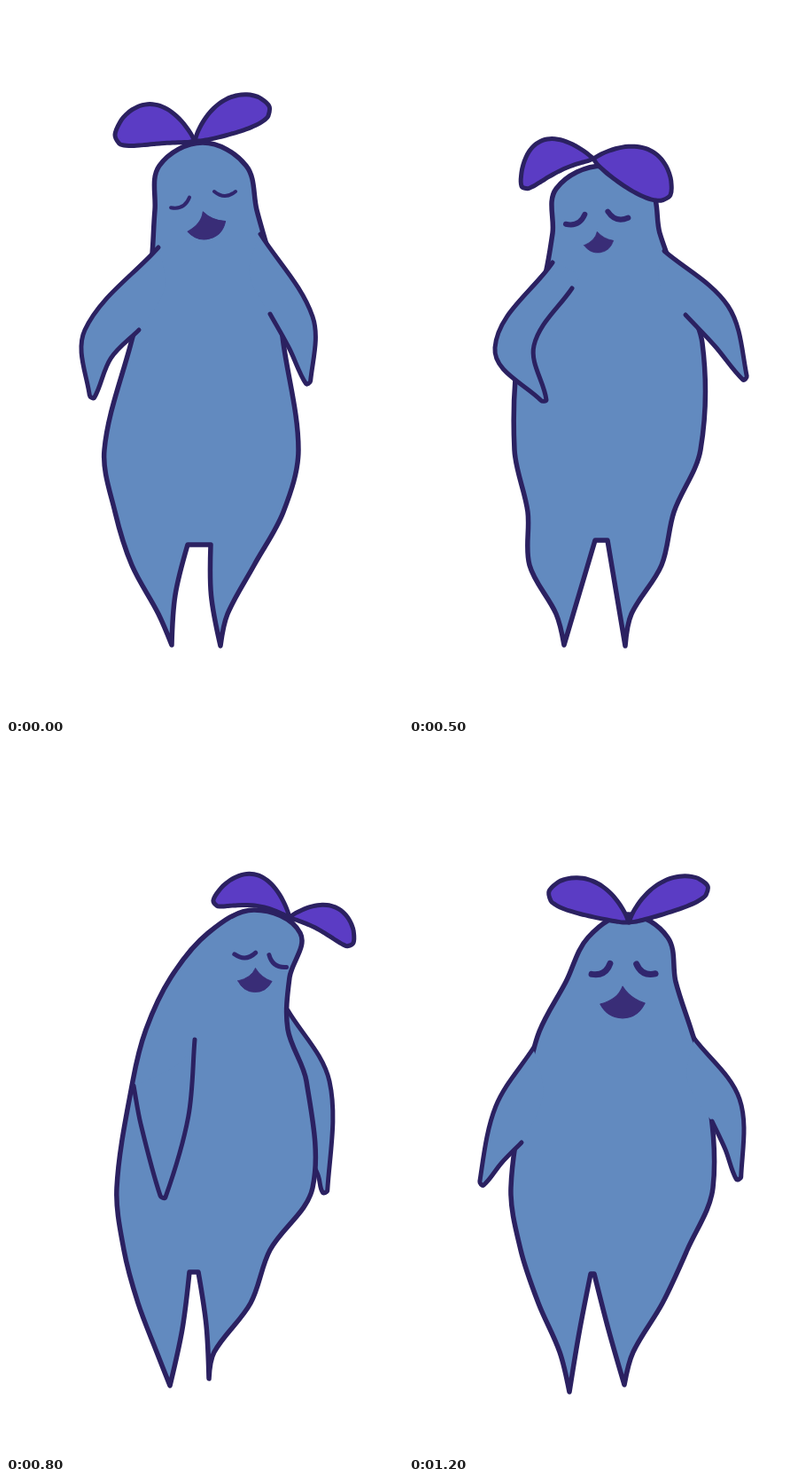
Animation, 448 px wide and 800 px high, one loop 1400 ms. Source, as an HTML page:

```html
<!DOCTYPE html>
<html lang="en">
<head>
<meta charset="utf-8">
<title>Dancing sprout</title>
<style>
  html, body { margin: 0; width: 100%; height: 100%; overflow: hidden; background: #fff; }
  svg { display: block; width: 100%; height: 100%; stroke-linejoin: round; stroke-linecap: round; }
</style>
</head>
<body>
<svg viewBox="0 0 448 800"></svg>
<script>
const INK = "#2b2161", SKIN = "#628abf", LEAF = "#5b3cc4", MOUTH = "#392d77";

// crown: x, y, half width      left, right: body edges from the cheeks down to the calves
// crotch: x, y, half gap, bend of the inner legs
// arms: shoulder, elbow, hand, armpit, bend of the inner edge
// leaves: tip, half width, bow      eyes: centre, angle      mouth: centre, angle, scale
const rest = {
  crown: [222, 154, 49], crotch: [218, 607, 13, -5], feet: [[187, 720], [242, 721]],
  left: [168, 162, 141, 111, 123, 142, 172], right: [283, 303, 313, 330, 313, 280, 250],
  arms: [[[172, 272], [89, 365], [97, 440], [150, 365], .15],
         [[287, 257], [346, 350], [341, 424], [298, 347], 0]], behind: 0,
  stem: [213, 152], leaves: [[123, 145, 23, 15], [297, 113, 20, -8]], point: .5,
  eyes: [[198, 224, -29], [247, 212, 0]], eyeWidth: 4, mouth: [226, 247, -14, .92]
};
const tipLeft = {
  crown: [197, 158, 48], crotch: [210, 608, 11, -11], feet: [[189, 717], [248, 718]],
  left: [138, 148, 144, 117, 130, 131, 165], right: [264, 297, 317, 336, 310, 283, 260],
  arms: [[[150, 296], [90, 375], [83, 450], [151, 363], .2],
         [[278, 267], [349, 338], [360, 434], [306, 362], 0]], behind: 0,
  stem: [180, 162], leaves: [[86, 176, 24, 4], [237, 246, 21, -6]], point: .9,
  eyes: [[160, 258, -40], [197, 245, -6]], eyeWidth: 5, mouth: [187, 278, -15, .74]
};
const swingBack = {
  crown: [219, 180, 53], crotch: [217, 602, 7, 0], feet: [[175, 720], [244, 721]],
  left: [162, 150, 125, 119, 134, 136, 166], right: [283, 306, 331, 329, 299, 285, 251],
  arms: [[[162, 289], [97, 385], [152, 444], [184, 318], .38],
         [[288, 276], [360, 338], [379, 419], [312, 348], 0]], behind: 0,
  stem: [208, 172], leaves: [[127, 203, 20, 20], [295, 213, 25, -11]], point: .6,
  eyes: [[189, 243, -27], [235, 238, 17]], eyeWidth: 6, mouth: [214, 266, -8, .7]
};
const tipRight = {
  crown: [280, 187, 52], crotch: [212, 595, 5, 3], feet: [[185, 723], [229, 715]],
  left: [186, 158, 143, 125, 133, 149, 170], right: [320, 318, 339, 346, 298, 276, 235],
  arms: [[[144, 385], [152, 428], [177, 510], [213, 333], -.25],
         [[318, 300], [365, 380], [360, 504], [345, 470], 0]], behind: 1,
  stem: [320, 195], leaves: [[234, 176, 18, 21], [392, 224, 16, -14]], point: .5,
  eyes: [[270, 239, -4], [305, 247, 35]], eyeWidth: 5, mouth: [281, 266, 2, .8]
};
const farRight = {
  crown: [305, 210, 47], crotch: [208, 597, 1, 4], feet: [[168, 727], [219, 719]],
  left: [208, 173, 149, 125, 137, 155, 164], right: [347, 335, 341, 347, 304, 269, 224],
  arms: [[[158, 368], [172, 430], [216, 500], [203, 340], -.1],
         [[336, 352], [369, 415], [354, 487], [346, 440], 0]], behind: 1,
  stem: [345, 209], leaves: [[286, 287, 21, -6], [363, 299, 15, -18]], point: .6,
  eyes: [[289, 296, 0], [331, 307, 60]], eyeWidth: 6, mouth: [296, 325, 20, .72]
};
const squash = {
  crown: [247, 192, 45], crotch: [207, 597, 2, -1], feet: [[181, 730], [243, 722]],
  left: [177, 147, 133, 115, 126, 146, 170], right: [301, 319, 336, 343, 314, 286, 253],
  arms: [[[140, 343], [98, 408], [82, 495], [127, 449], 0],
         [[322, 332], [373, 400], [372, 489], [342, 425], 0]], behind: 0,
  stem: [248, 201], leaves: [[158, 166, 20, 9], [337, 160, 18, -8]], point: .5,
  eyes: [[218, 256, -30], [266, 256, 27]], eyeWidth: 7, mouth: [241, 291, 0, 1.05]
};

// Blends numbers, arrays and whole poses; t above 1 exaggerates.
function mix(a, b, t) {
  if (typeof a === "number") return a + (b - a) * t;
  const blend = key => mix(a[key], b[key], t);
  if (Array.isArray(a)) return a.map((_, i) => blend(i));
  return Object.fromEntries(Object.keys(a).map(key => [key, blend(key)]));
}
const headOf = ({ stem, leaves, point, eyes, eyeWidth, mouth }) =>
  ({ stem, leaves, point, eyes, eyeWidth, mouth });

const farLeft = {
  ...mix(rest, tipLeft, 1.3), ...headOf(farRight),
  crown: [170, 175, 48], place: "matrix(-1 0 0 1 472 -35)"
};
const tall = {
  ...mix(rest, tipRight, .5), ...headOf(rest),
  crown: [246, 145, 49], place: "translate(24 -9)"
};
const dance = [
  [rest, 200], [tipLeft, 100], [farLeft, 200], [swingBack, 100], [tall, 200],
  [tipRight, 100], [farRight, 200], [mix(farRight, squash, .5), 100], [squash, 200]
];
const loop = dance.reduce((sum, [, hold]) => sum + hold, 0);

// Smooth line through points [x, y, sharp].
function curve(pts, closed) {
  const n = pts.length;
  const at = i => closed ? pts[(i + n) % n] : pts[Math.min(Math.max(i, 0), n - 1)];
  const handle = (i, reach) => {
    const [x, y, sharp] = at(i), a = at(i - 1), b = at(i + 1);
    const dx = b[0] - a[0], dy = b[1] - a[1];
    const k = sharp ? 0 : reach / (Math.hypot(dx, dy) || 1);
    return [x + dx * k, y + dy * k];
  };
  let d = `M${pts[0].slice(0, 2)}`;
  for (let i = 0; i < (closed ? n : n - 1); i++) {
    const [x, y] = at(i), [u, v] = at(i + 1);
    const reach = Math.hypot(u - x, v - y) / 3;
    d += `C${handle(i, reach)} ${handle(i + 1, -reach)} ${u},${v}`;
  }
  return d;
}
const path = (d, fill, stroke = "none", width = 5.5, extra = "") =>
  `<path d="${d}" fill="${fill}" stroke="${stroke}" stroke-width="${width}" ${extra}/>`;

function torso({ crown: [cx, cy, half], left, right, feet, crotch: [x, y, gap, bend] }) {
  const cheek = cy + 76;
  const heights = [cheek, (cheek + 380) / 2, 380, 500, 570, 630, 685];
  const edge = xs => xs.map((ex, i) => [ex, heights[i]]);
  const leg = (foot, side) => {
    const top = [x + side * gap, y];
    const knee = mix(foot, top, .5);
    return [[...foot, true], [knee[0] + bend, knee[1]], [...top, true]];
  };
  return path(curve([
    [cx, cy], [cx + half, cy + 26], ...edge(right), ...leg(feet[1], 1),
    ...leg(feet[0], -1).reverse(), ...edge(left).reverse(), [cx - half, cy + 26]
  ], true), SKIN, INK);
}

function arm([shoulder, elbow, hand, pit, bend], side) {
  const inner = mix(mix(hand, pit, .5), elbow, bend);
  const dx = hand[0] - inner[0], dy = hand[1] - inner[1], len = Math.hypot(dx, dy);
  const fingertip = s => [hand[0] + s * side * dy / len * 3, hand[1] - s * side * dx / len * 3];
  const line = [shoulder, elbow, fingertip(1), fingertip(-1), inner, pit];
  const root = mix(shoulder, pit, .5);
  root[0] -= side * 18;
  const sharpEnds = line.map((p, i) => i % 5 ? p : [...p, true]);
  return path(curve([...sharpEnds, root], true), SKIN) + path(curve(line), "none", INK, 5);
}

function leaf(stem, [tx, ty, width, bow], point) {
  const dx = tx - stem[0], dy = ty - stem[1], len = Math.hypot(dx, dy);
  const taper = .85, widest = taper / (taper + point), steps = 16;
  const edge = (t, side) => {
    const half = width * (t / widest) ** taper * ((1 - t) / (1 - widest)) ** point;
    const off = (bow * 4 * t * (1 - t) + side * half) / len;
    return [stem[0] + dx * t - dy * off, stem[1] + dy * t + dx * off];
  };
  const pts = [[...stem, true]];
  for (let i = 1; i < 2 * steps; i++) {
    pts.push(i <= steps ? edge(i / steps, 1) : edge(2 - i / steps, -1));
  }
  return path(curve(pts, true), LEAF, INK, 5);
}

const eye = ([x, y, angle], width) =>
  path("M-12-3Q0 7 12-3", "none", "#30266e", width,
    `transform="translate(${x} ${y}) rotate(${angle})"`);
const mouth = ([x, y, angle, scale]) =>
  path("M-24 2Q-5-3 0-17Q8-4 24 1Q16 17 0 17Q-16 17-24 2Z", MOUTH, MOUTH, 1,
    `transform="translate(${x} ${y}) rotate(${angle}) scale(${scale})"`);

function figure(pose) {
  const [leftArm, rightArm] = [arm(pose.arms[0], -1), arm(pose.arms[1], 1)];
  const body = torso(pose);
  return (pose.behind > .5 ? rightArm + body : body + rightArm) + leftArm +
    `<g transform="${pose.place || "translate(0)"}">` +
    pose.eyes.map(e => eye(e, pose.eyeWidth)).join("") + mouth(pose.mouth) +
    pose.leaves.map(l => leaf(pose.stem, l, pose.point)).reverse().join("") + "</g>";
}

const svg = document.querySelector("svg");
let shown = null;
function draw(time) {
  let rest = time % loop;
  const [pose] = dance.find(([, hold]) => (rest -= hold) < 0);
  if (pose === shown) return;
  shown = pose;
  svg.innerHTML = figure(pose);
}

const start = performance.now();
function tick() {
  draw(performance.now() - start);
  requestAnimationFrame(tick);
}
tick();
</script>
</body>
</html>
```
